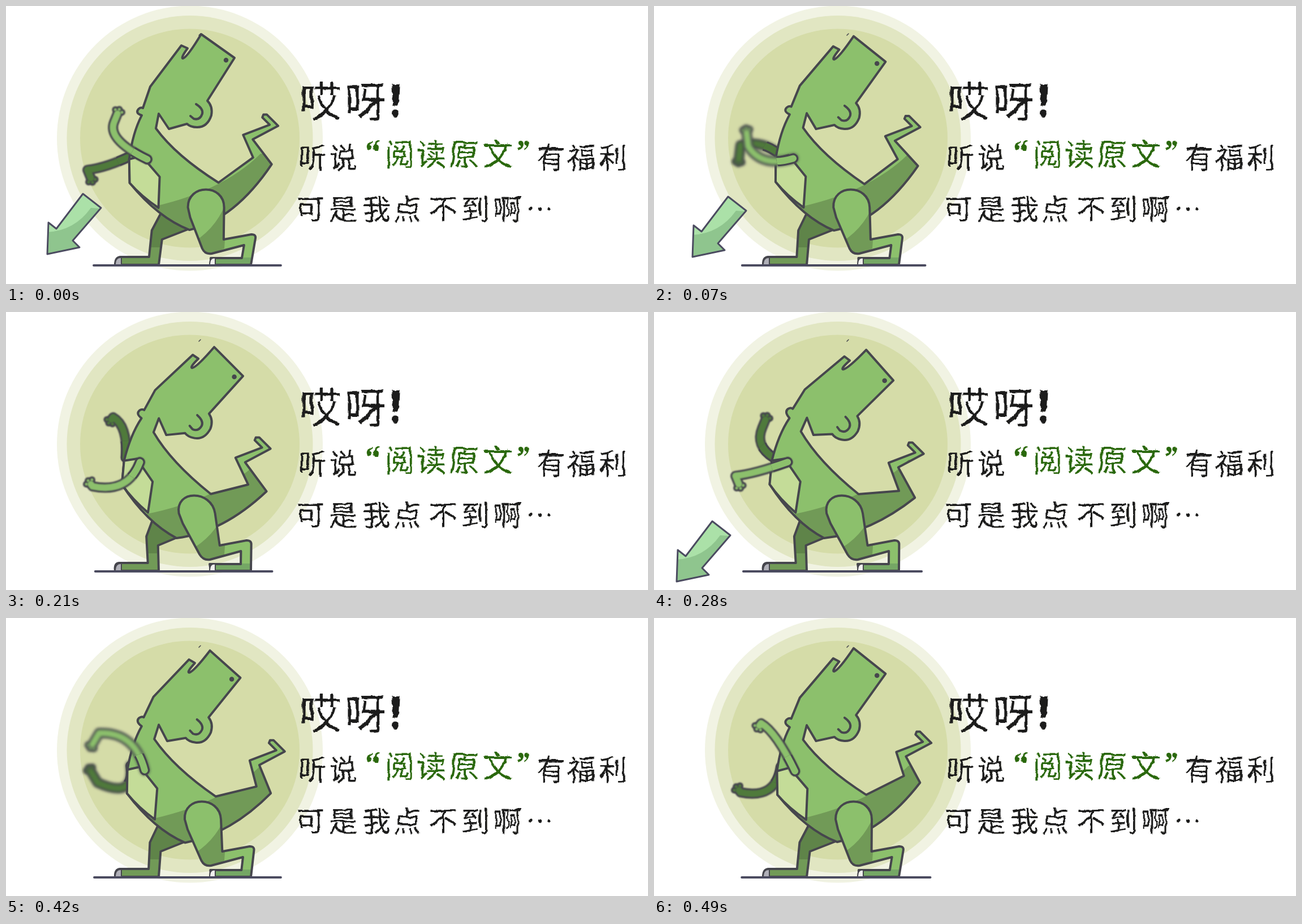
These frames come from a looping animation (1135x493 px, 560 ms). An HTML page with a canvas:

```html
<!DOCTYPE html>
<html lang="zh-CN">
<head>
<meta charset="utf-8">
<style>
html, body { margin: 0; width: 1135px; height: 493px; overflow: hidden; background: #fff; }
canvas, svg { position: absolute; left: 0; top: 0; }
text { font: 500 50px "Noto Sans CJK SC", "Noto Sans CJK", sans-serif; fill: #1c1c1a; text-anchor: middle; }
.big { font-size: 74px; }
.mark { font: 600 80px "Noto Sans", sans-serif; }
.green { font-size: 53px; fill: #2a6808; }
.quote { font: 700 54px "Noto Serif", serif; fill: #2a6808; }
</style>
</head>
<body>
<canvas width="1135" height="493"></canvas>
<svg width="1135" height="493">
  <filter id="brush">
    <feTurbulence baseFrequency=".035" numOctaves="2" seed="4"/>
    <feDisplacementMap in="SourceGraphic" scale="6" xChannelSelector="R" yChannelSelector="G"/>
  </filter>
  <g filter="url(#brush)">
    <text class="big" x="554 634" y="195">哎呀</text>
    <text class="mark" x="687" y="195">!</text>
    <text x="541 594" y="286">听说</text>
    <text class="quote" x="647" y="276">“</text>
    <text class="green" x="694 750 808 868" y="281">阅读原文</text>
    <text class="quote" x="914" y="276">”</text>
    <text x="961 1016 1072" y="286">有福利</text>
    <text x="536 594 654 708 771 828 885 942" y="377">可是我点不到啊…</text>
  </g>
</svg>
<script>
const ctx = document.querySelector('canvas').getContext('2d');
const STEP = 70, POSES = 8;
const LINE = '#46464d', INK = '#4b4b60', SKIN = '#8cc06c', SHADE = '#719a57', DARK = '#5f8449';

// Upright figure; every pose bends these outlines.
const BACK = 'M219 314 L218 272 Q224 225 240 194';
const HEAD = 'Q228 190 234 183 Q238 179 242 181 L255 143 L310 70 L321 75 Q308 93 313 93 Q321 90 345 50 ' +
  'L404 92 L356 168 Q366 178 363 194 Q356 215 338 215 Q326 215 320 209 L288 218 L270 191 L265 217';
const SPINE = 'Q300 265 376 313';
const BELLY = 'Q405 378 325 397 Q270 376 219 314 Z';
const CHEST = 'M218 272 L240 266 L272 303 L270 358 Q240 338 219 314 Z';
const EAR = 'M336 174 Q349 182 347 191 Q343 203 332 200 L326 195';
const FAR_LEG = 'M275 366 L258 398 L253 445 L202 445 Q193 446 193 459 L270 459 L276 414 L322 396';
const NEAR_LEG = 'M322 357 C322 315 386 315 386 357 L385 414 L434 405 Q443 405 441 413 L433 459 ' +
  'L362 459 L362 447 L417 447 L421 424 L364 439 Q352 441 347 430 L326 375 Z';

// Applies a point rule to every coordinate pair of a path.
const warp = (d, rule) =>
  d.replace(/([\d.]+) ([\d.]+)/g, (_, x, y) => rule(+x, +y).join(' '));

// Harmonic motion over the loop, highest at the pose `peak`.
const swing = (pose, mean, size, peak, times = 1) =>
  mean + size * Math.cos((pose - peak) * times * 2 * Math.PI / POSES);

function disc(x, y, r, color) {
  ctx.fillStyle = color;
  ctx.beginPath();
  ctx.arc(x, y, r, 0, 7);
  ctx.fill();
}

function stroke(d, width = 4, color = LINE) {
  ctx.lineWidth = width;
  ctx.strokeStyle = color;
  ctx.stroke(new Path2D(d));
}

// Filled, outlined shape; each [path, color] overlay is clipped to it.
function part(d, fill, overlays = [], width = 4, line = LINE) {
  const path = new Path2D(d);
  ctx.fillStyle = fill;
  ctx.fill(path);
  ctx.save();
  ctx.clip(path);
  for (const [shade, color] of overlays) {
    ctx.fillStyle = color;
    ctx.fill(new Path2D(shade));
  }
  ctx.restore();
  stroke(d, width, line);
}

function arm(pose, sx, sy, color) {
  const hx = 150 + 50 * Math.max(0, swing(pose, 0, 1, 7.7)) ** 2;
  const hy = swing(pose, 248, 62, 3.5);
  const dx = swing(pose, 3, 9, 2, 2), dy = swing(pose, 0, 25, 1.2);
  const ex = swing(pose, 203, 28, 2.3, 2), ey = swing(pose, 262, 65, 2.5);
  const limb = `M${sx} ${sy} Q${ex} ${ey} ${hx + dx} ${hy + dy} L${hx} ${hy}`;
  const aim = Math.atan2(-dy, -dx);
  const fingers = [-.9, 0, .9].map(a =>
    [hx + 8 * Math.cos(aim + a), hy + 8 * Math.sin(aim + a)]);
  const paint = () => {
    stroke(limb, 18);
    for (const [x, y] of fingers) disc(x, y, 6, LINE);
    stroke(limb, 11.5, color);
    for (const [x, y] of fingers) disc(x, y, 2.5, color);
  };
  ctx.save();
  ctx.filter = `blur(${swing(pose, 1.7, 1.2, 1.5, 2)}px)`;
  paint();
  ctx.restore();
  // The shoulder stays sharp while the rest is in motion.
  ctx.save();
  ctx.beginPath();
  ctx.arc(sx, sy, 30, 0, 7);
  ctx.clip();
  paint();
  ctx.restore();
}

function arrow(pose) {
  if (pose % 4 > 1) return;
  ctx.save();
  if (pose > 3) ctx.translate(-33, 38);
  else ctx.translate(-5 * pose, 5 * pose);
  part('M73 440 L75 384 L89 395 L136 333 L168 358 L118 416 L130 428 Z', '#abe1a8',
    [['M70 401 Q120 400 150 358 L180 360 L130 445 L65 445 Z', '#8fc58e']], 3, INK);
  ctx.restore();
}

function tail(pose) {
  const x = swing(pose, 417, -14, 2.2), y = swing(pose, 248, 20, 4.3);
  const hook = [[0, 0], [47, -18], [34, -31], [36, -36], [42, -36], [62, -16], [17, 8]];
  return `L${swing(pose, 435, -8, 2.3)} ${swing(pose, 293, 25, 4.3)}` +
    hook.map(([dx, dy]) => `L${x + dx} ${y + dy}`).join('') +
    `L${swing(pose, 465.5, -5, 3.3)} ${swing(pose, 305, 25, 4.3)}`;
}

function draw(pose) {
  const crouch = swing(pose, .5, -.5, -.4);
  const angle = 13 * Math.PI / 180 * (1 - Math.abs(pose - 4) / 4);
  const cos = Math.cos(angle), sin = Math.sin(angle);
  const nod = d => warp(d, (x, y) =>
    [285 + (x - 285) * cos - (y - 191) * sin, 191 + (x - 285) * sin + (y - 191) * cos]);
  const lean = d => warp(d, (x, y) =>
    [x - .12 * crouch * (y - 190), y + .12 * crouch * (x - 290)]);
  const step = d => warp(d, (x, y) => [x - .17 * crouch * (459 - y), y]);
  const sx = 250 - 14 * crouch, sy = 272 - 6 * crouch;

  ctx.clearRect(0, 0, 1135, 493);
  ctx.lineJoin = ctx.lineCap = 'round';
  disc(325, 234.5, 235, '#f1f3e3');
  disc(325, 234.5, 217.5, '#e1e6c2');
  disc(325, 234.5, 194, '#d5dca8');
  stroke('M341 52 L344 49', 1.5);
  arrow(pose);

  arm((pose + POSES / 2) % POSES, sx - 25, sy - 8, '#4f7a3b');
  part(step(FAR_LEG), DARK, [['M180 428 H300 V470 H180 Z', SHADE]]);
  part('M204 446 Q193 445 193 459 L204 459 Z', '#b0b0b8', [], 2);
  part(lean(BACK) + nod(HEAD) + lean(SPINE) + tail(pose) + lean(BELLY), SKIN,
    [['M245 359 Q380 332 450 262 L500 262 L500 410 L245 410 Z', SHADE]]);
  part(lean(CHEST), '#c4dc98');
  stroke(nod(EAR));
  stroke(nod('M389 96 L389 96'), 8.5);
  part(step(NEAR_LEG), SKIN,
    [['M392 340 Q376 390 334 417 L350 445 L386 430 Z', SHADE],
     ['M355 446 H440 V462 H355 Z', '#75a765']]);
  part('M370 447 Q360 445 360 459 L370 459 Z', '#f0f0ee', [], 2);
  arm(pose, sx, sy, SKIN);
  stroke(`M${155 + 3 * crouch} 460 H${swing(pose, 479.5, -9, 3)}`, 4, INK);
}

function tick() {
  draw(Math.floor(performance.now() / STEP) % POSES);
  requestAnimationFrame(tick);
}
tick();
</script>
</body>
</html>
```
